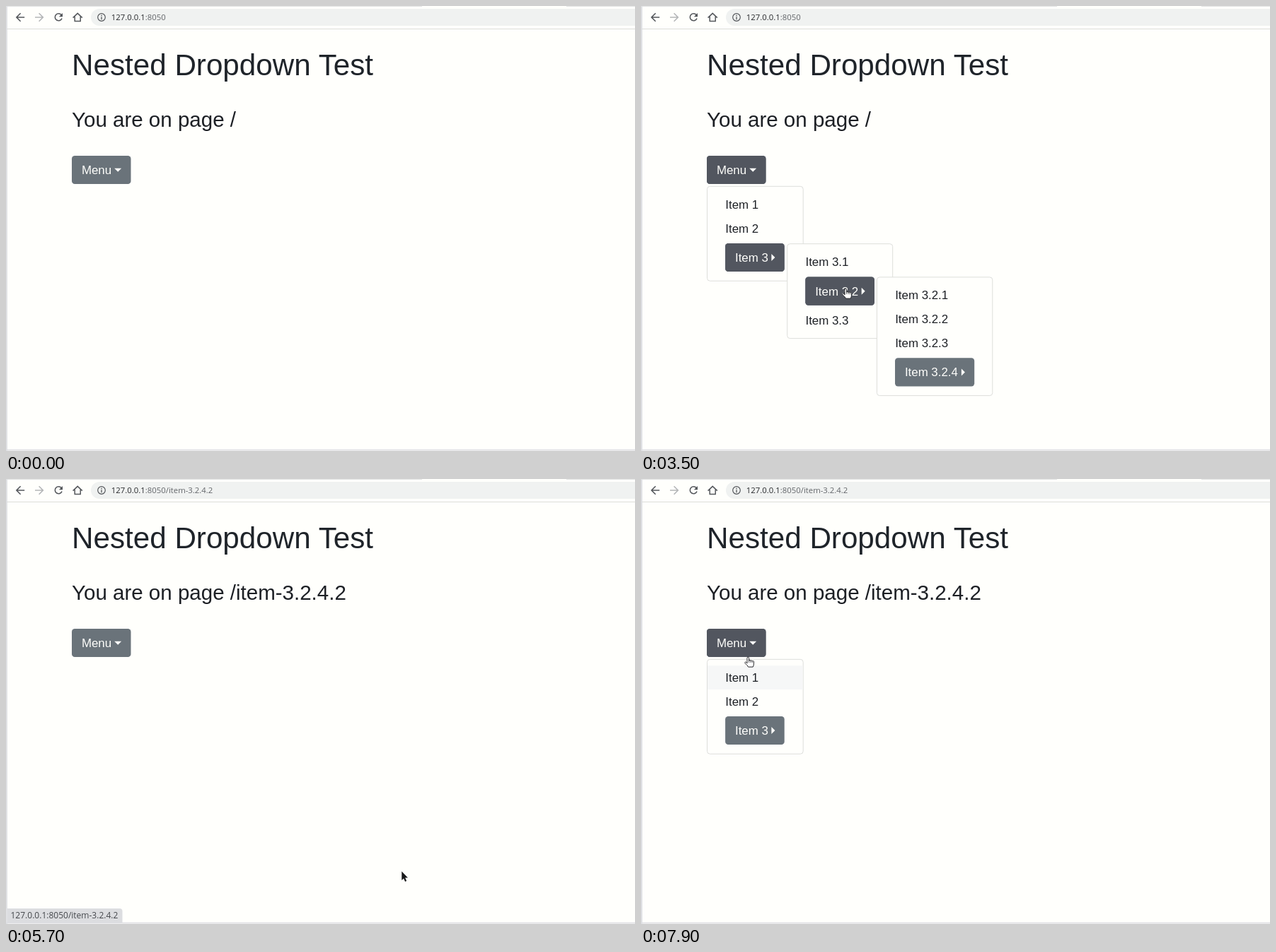
An HTML page for the animation above (8 s loop, 889 by 630 pixels).

```html
<!DOCTYPE html>
<html lang="en">
<head>
<meta charset="utf-8">
<title>Nested dropdown</title>
<style>
  html, body { margin: 0; width: 100%; height: 100%; overflow: hidden; background: #fffffc; }
  svg { display: block; width: 889px; height: 630px; }
  text { font-family: "Liberation Sans", Arial, sans-serif; font-size: 16.88px; fill: #1d2025; white-space: pre; }
  .title { font-size: 42.2px; fill: #1f242a; }
  .sub { font-size: 29.53px; }
  .url { font: 11.35px "Open Sans", "Noto Sans", sans-serif; fill: #26282b; }
  .url tspan { fill: #626569; }
  .status text { font: 12px "Open Sans", "Noto Sans", sans-serif; fill: #45484c; }
  .icon { fill: none; stroke: #54575b; stroke-width: 1.6; }
  .panel { fill: #fffffc; stroke: #dddedb; }
  .base { fill: #6a737a; }
  .hover { fill: #5b626a; }
  .open { fill: #52565f; }
  .lit { fill: #f6f7f7; }
  .btn text, .caret { fill: #fffffc; }
</style>
</head>
<body>
<svg viewBox="0 0 889 630">
  <rect width="889" height="630" fill="#fffffc"/>
  <path d="M0 .5H588M792 .5H889" stroke="#e2e3e3"/>
  <path d="M0 32.5H889" stroke="#dcdddb"/>
  <path d="M1 0V630M0 628.7H889" stroke="#dddee2" stroke-width="1.8"/>

  <g class="icon">
    <path d="M26.2 16H15.4M20.6 10.3L14.9 16L20.6 21.7"/>
    <path d="M41 16H51.8M46.6 10.3L52.3 16L46.6 21.7" stroke="#b4b6b7"/>
    <path d="M78.2 12.6A5 5 0 1 0 79 17.4"/>
    <path d="M80 10V15.2H74.8Z" fill="#54575b" stroke="none"/>
    <path d="M94.6 16.6L101.2 10.4L107.8 16.6M97.2 15V21.4H105.2V15" stroke-width="1.5"/>
  </g>
  <rect x="120" y="4" width="800" height="24" rx="12" fill="#f0f2f1"/>
  <circle cx="135" cy="16" r="5.3" class="icon" style="stroke-width:1.2"/>
  <path d="M135 12.8V14.2M135 15.2V19.2" stroke="#54575b" stroke-width="1.3"/>
  <text class="url" x="148.8" y="20">127.0.0.1<tspan>:8050</tspan><tspan data-on="5700-8000">/item-3.2.4.2</tspan></text>

  <text class="title" x="93" y="98">Nested Dropdown Test</text>
  <text class="sub" x="93" y="171">You are on page /<tspan data-on="5700-8000">item-3.2.4.2</tspan></text>

  <g id="menus"></g>

  <g class="status" id="status" data-on="5200-6100">
    <path d="M2 608H160.5Q164.5 608 164.5 612V628H2Z" fill="#dcdde0"/>
    <text x="6.5" y="622.3">127.0.0.1:8050/item-3.2.4.2</text>
  </g>

  <g id="pointer" data-on="1100-8000">
    <path data-on="1100-1400 5700-7300" d="M.6 .6V13L3.4 10.4L5.4 15L7.4 14.1L5.4 9.6H9.2Z"
      fill="#17181a" stroke="#f4f4f2" stroke-width=".8" paint-order="stroke"/>
    <g data-on="1400-5700 7300-8000" fill="#fff" stroke="#26272a">
      <path d="M4 9.4V2A1.3 1.3 0 0 1 6.6 2V6A1.2 1.2 0 0 1 9 6.2A1.2 1.2 0 0 1 11.3 6.7A1.1 1.1 0 0 1 13.4 7.3V10.4Q13.4 12.4 12.2 14.6H5.6Q4.4 12.2 1 9.2Q.4 8 1.6 7.5Q2.7 7.5 4 9.4Z"/>
      <path d="M6.6 6V8.4M9 6.4V8.6M11.3 6.8V8.8" stroke-width=".7"/>
    </g>
  </g>
</svg>
<script>
const LOOP = 8000, STEP = 100;
const ITEM = 33.76, BTN = 40.1, PAD = 9.44, GAP = 4.22;

const rect = (x, y, w, h, cls, attrs = "") =>
  `<rect x="${x}" y="${y}" width="${w}" height="${h}" class="${cls}" ${attrs}/>`;
const label = (x, y, s) => `<text x="${x}" y="${y}">${s}</text>`;

function button(x, y, w, name, hover, open, down) {
  const cx = x + w - 13.3, cy = y + BTN / 2;
  const caret = down
    ? `M${cx - 10} ${cy - 2.2}h10l-5 5Z`
    : `M${cx - 5} ${cy - 5}v10l5 -5Z`;
  return `<g class="btn">${rect(x, y, w, BTN, "base", 'rx="4.2"')}
    ${rect(x, y, w, BTN, "hover", `rx="4.2" data-on="${hover}"`)}
    ${rect(x, y, w, BTN, "open", `rx="4.2" data-on="${open}"`)}
    ${label(x + 13.9, y + 25.9, name)}<path class="caret" d="${caret}"/></g>`;
}

// Items: plain {name, lit} or a nested toggle {name, width, hover, open}.
function panel(x, y, w, on, items) {
  let top = y + PAD, rows = "";
  for (const it of items) {
    if (it.width) {
      rows += button(x + 26.1, top + GAP, it.width, it.name, it.hover, it.open);
      top += BTN + 2 * GAP;
    } else {
      if (it.lit) rows += rect(x + 1, top, w - 2, ITEM, "lit", `data-on="${it.lit}"`);
      rows += label(x + 26.3, top + 22.6, it.name);
      top += ITEM;
    }
  }
  const box = rect(x + .5, y + .5, w - 1, top + PAD - y - 1, "panel", 'rx="4"');
  return `<g data-on="${on}">${box}${rows}</g>`;
}

const OPEN1 = "1600-5700 7500-8000", OPEN2 = "2500-5700", OPEN3 = "3300-5700", OPEN4 = "4500-5700";

document.getElementById("menus").innerHTML =
  button(93, 212, 83.5, "Menu", "1400-1600 7300-7500", OPEN1, true) +
  panel(93, 254.8, 136.7, OPEN1, [
    { name: "Item 1", lit: "1900-2300 7900-8000" },
    { name: "Item 2", lit: "2300-2400" },
    { name: "Item 3", width: 83.6, hover: "2400-2500", open: OPEN2 }]) +
  panel(206.2, 336.2, 150, OPEN2, [
    { name: "Item 3.1", lit: "3100-3200" },
    { name: "Item 3.2", width: 97.7, hover: "3200-3300", open: OPEN3 },
    { name: "Item 3.3" }]) +
  panel(332.9, 383.4, 164.4, OPEN3, [
    { name: "Item 3.2.1" },
    { name: "Item 3.2.2", lit: "4000-4100" },
    { name: "Item 3.2.3", lit: "4100-4200" },
    { name: "Item 3.2.4", width: 112.2, hover: "4200-4500", open: OPEN4 }]) +
  panel(473.7, 498.4, 141.6, OPEN4, [
    { name: "Item 3.2.4.1", lit: "4800-5000" },
    { name: "Item 3.2.4.2", lit: "5000-5700" }]);

const smooth = p => p * p * (3 - 2 * p);
const easeIn = p => p ** 1.4;
const easeOut = p => 1 - (1 - p) ** 2;

// Pointer moves: first step, last step, end x, end y, easing.
const start = [35, 175];
const moves = [
  [1200, 1500, 132.5, 231.5],
  [1900, 2000, 137, 241],
  [2200, 2500, 154, 348],
  [2900, 3300, 257, 393],
  [3500, 3500, 284, 399.5],
  [3700, 4400, 405, 518],
  [4600, 5100, 555, 552],
  [5700, 5700, 558.7, 555],
  [6300, 7100, 226, 275, easeIn],
  [7200, 7200, 190.3, 251.5],
  [7300, 7500, 132, 235, easeOut],
  [7900, 7900, 146, 251.5]
];

function pointerAt(t) {
  let [x, y] = start;
  for (const [from, to, ex, ey, ease = smooth] of moves) {
    if (t < from) break;
    const k = ease(Math.min(1, (t - from + STEP) / (to - from + STEP)));
    x += (ex - x) * k;
    y += (ey - y) * k;
  }
  return [x, y];
}

const timed = [...document.querySelectorAll("[data-on]")].map(el => ({
  el, spans: el.dataset.on.split(" ").map(s => s.split("-").map(Number))
}));
const pointer = document.getElementById("pointer");
const status = document.getElementById("status");
const statusBox = status;

function draw(t) {
  for (const { el, spans } of timed)
    el.style.display = spans.some(([a, b]) => t >= a && t < b) ? "" : "none";
  pointer.setAttribute("transform", `translate(${pointerAt(t)})`);
  document.getElementById("status").style.opacity = t < 5400 ? .75 : t < 6000 ? 1 : .5;
}

let t0;
function tick(now) {
  t0 ??= now;
  draw(Math.floor((now - t0) % LOOP / STEP) * STEP);
  requestAnimationFrame(tick);
}
draw(0);
requestAnimationFrame(tick);
</script>
</body>
</html>
```
